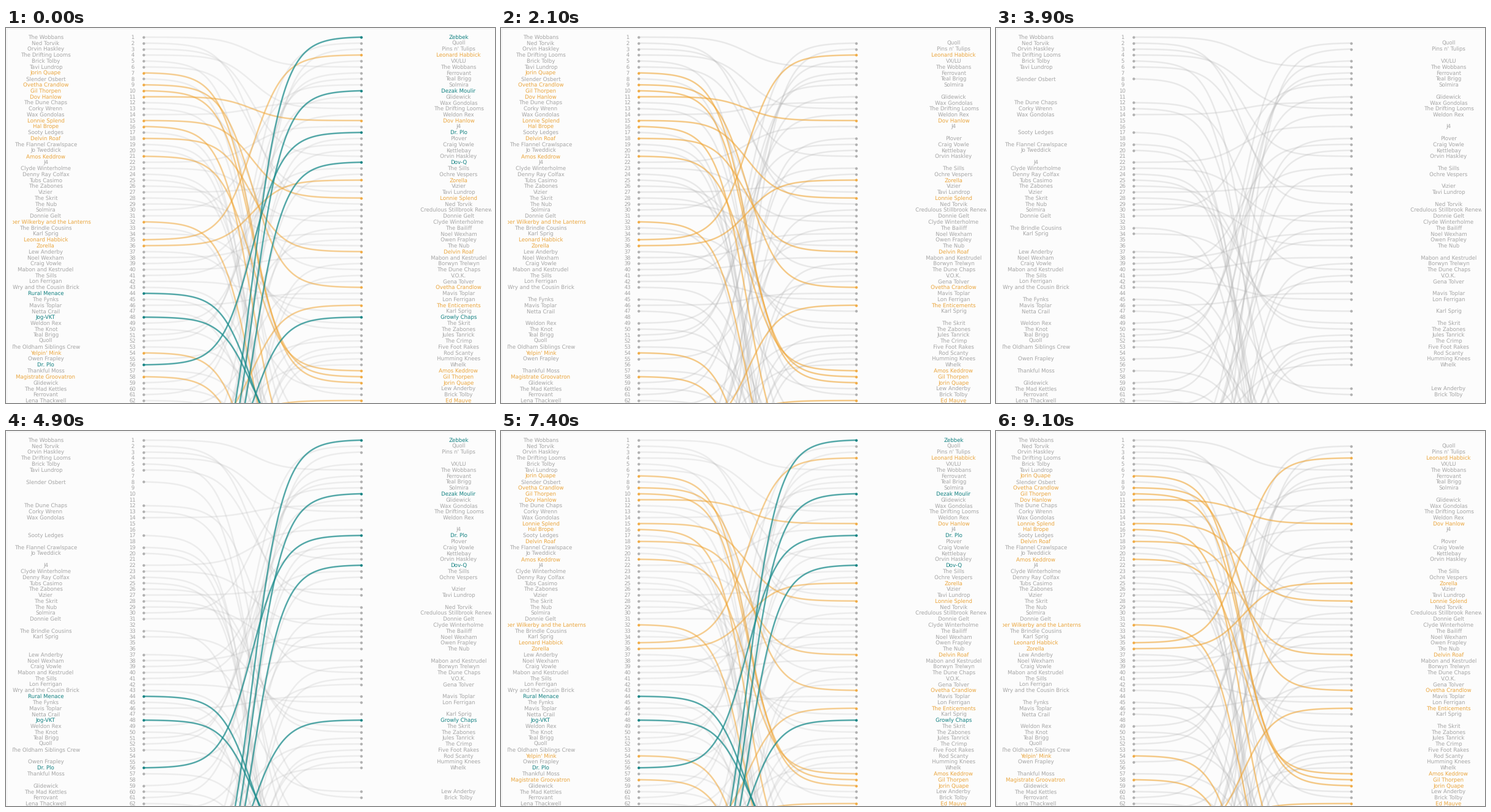
A matplotlib script for the animation above (9200 ms loop, 800x615 px).

```python
import matplotlib.pyplot as plt
import numpy as np
from matplotlib.animation import FuncAnimation
from matplotlib.collections import LineCollection
from matplotlib.patches import Rectangle

W, H, DPI = 800, 615, 100
PX = 72 / DPI
FRAMES, STEP = 92, 100

# "*" marks soul acts, "#" marks rap acts
LEFT = """The Wobbans, Ned Torvik, Orvin Haskley, The Drifting Looms, Brick Tolby,
Tavi Lundrop, *Jorin Quape, Slender Osbert, *Ovetha Crandlow, *Gil Thorpen,
*Dov Hanlow, The Dune Chaps, Corky Wrenn, Wax Gondolas, *Lonnie Splend,
*Hal Brope, Sooty Ledges, *Delvin Roaf, The Flannel Crawlspace, Jo Tweddick,
*Amos Keddrow, J4, Clyde Winterholme, Denny Ray Colfax, Tubs Casimo,
The Zabones, Vizier, The Skrit, The Nub, Solmira, Donnie Gelt,
*Dapper Wilkerby and the Lanterns, The Brindle Cousins, Karl Sprig,
*Leonard Habbick, *Zorella, Lew Anderby, Noel Wexham, Craig Vowle,
Mabon and Kestrudel, The Sills, Lon Ferrigan, Wry and the Cousin Brick,
#Rural Menace, The Fynks, Mavis Toplar, Netta Crail, #Jog-VKT, Weldon Rex,
The Knot, Teal Brigg, Quoll, The Oldham Siblings Crew, *Yelpin' Mink,
Owen Frapley, #Dr. Plo, Thankful Moss, *Magistrate Groovatron, Glidewick,
The Mad Kettles, Ferrovant, Lena Thackwell"""

RIGHT = """#Zebbek, Quoll, Pins n' Tulips, *Leonard Habbick, VX/LU, The Wobbans,
Ferrovant, Teal Brigg, Solmira, #Dezak Moulir, Glidewick, Wax Gondolas,
The Drifting Looms, Weldon Rex, *Dov Hanlow, J4, #Dr. Plo, Plover, Craig Vowle,
Kettlebay, Orvin Haskley, #Dov-Q, The Sills, Ochre Vespers, *Zorella, Vizier,
Tavi Lundrop, *Lonnie Splend, Ned Torvik, Credulous Stillbrook Renewal,
Donnie Gelt, Clyde Winterholme, The Bailiff, Noel Wexham, Owen Frapley, The Nub,
*Delvin Roaf, Mabon and Kestrudel, Borwyn Trelwyn, The Dune Chaps, V.O.K.,
Gena Tolver, *Ovetha Crandlow, Mavis Toplar, Lon Ferrigan, *The Enticements,
Karl Sprig, #Growly Chaps, The Skrit, The Zabones, Jules Tanrick, The Crimp,
Five Foot Rakes, Rod Scanty, Humming Knees, Whelk, *Amos Keddrow, *Gil Thorpen,
*Jorin Quape, Lew Anderby, Brick Tolby, *Ed Mauve"""

# Ranks below the visible part, for acts listed on one side only
LOW_RIGHT = [72, 67, 75, 92, 86, 95, 79, 82, 84, 87, 70,
             74, 81, 88, 71, 76, 68, 93, 73, 96, 78, 80]
LOW_LEFT = [83, 92, 72, 86, 75, 73, 88, 85, 82, 70, 95,
            97, 63, 68, 77, 84, 65, 94, 91, 100, 67, 66]

# text, dot, line colour, line alpha
STYLE = {
    "rock": ("#a4a4a4", "#b0b0b0", "#b0b0b0", 0.20),
    "soul": ("#eaa53c", "#f0ab45", "#efa433", 0.53),
    "rap": ("#0f8080", "#158383", "#1c8c8c", 0.75),
}
X0, X1 = 225, 580.5
STEEP = 7


def parse(block):
    kinds = {"*": "soul", "#": "rap"}
    acts = [a.strip() for a in block.replace("\n", " ").split(",")]
    return {a.lstrip("*#"): (i, kinds.get(a[0], "rock"))
            for i, a in enumerate(acts, 1)}


def row_y(rank):
    return 15 + (rank - 1) * 9.77


def curve(a, b):
    t = np.linspace(-STEEP, STEEP, 140)
    s = 1 / (1 + np.exp(-t))
    s = (s - s[0]) / (s[-1] - s[0])
    return np.column_stack([np.linspace(X0, X1, t.size),
                            row_y(a) + (row_y(b) - row_y(a)) * s])


plt.rcParams["font.family"] = "DejaVu Sans"
plt.rcParams["text.hinting"] = "none"
fig = plt.figure(figsize=(W / DPI, H / DPI), dpi=DPI, facecolor="#fcfcfc")
ax = fig.add_axes([0, 0, 1, 1])
ax.set_xlim(0, W)
ax.set_ylim(H, 0)
ax.axis("off")
ax.add_patch(Rectangle((0.5, 0.5), W - 1, H + 2, fill=False,
                       ec="#eeeeee", lw=PX))
panel = Rectangle((11, 0), 783, H, transform=ax.transData)


def label(x, rank, text, color):
    t = ax.text(x, row_y(rank) + 3, text, color=color, size=8.65 * PX,
                ha="center", va="baseline", clip_on=True)
    t.set_clip_path(panel)
    return t


left, right = parse(LEFT), parse(RIGHT)
low_left, low_right = iter(LOW_LEFT), iter(LOW_RIGHT)
links = {k: [] for k in STYLE}
for name, (rank, kind) in left.items():
    end = right[name][0] if name in right else next(low_right)
    links[kind].append((rank, end))
for name, (rank, kind) in right.items():
    if name not in left:
        links[kind].append((next(low_left), rank))

for n in range(1, len(left) + 1):
    label(207, n, str(n), "#a4a4a4")

groups, lines = {}, {}
for z, (kind, (ink, dot, stroke, alpha)) in enumerate(STYLE.items(), 1):
    lines[kind] = LineCollection([curve(a, b) for a, b in links[kind]],
                                 colors=stroke, alpha=alpha,
                                 linewidths=2.5 * PX, zorder=z)
    ax.add_collection(lines[kind], autolim=False)
    ends = [(x, row_y(r)) for pair in links[kind]
            for x, r in zip((X0, X1), pair)]
    dots, = ax.plot(*zip(*ends), "o", ms=4.3 * PX, color=dot, mew=0,
                    zorder=z + 4)
    groups[kind] = [lines[kind], dots]
    for x, side in ((65, left), (740.5, right)):
        groups[kind] += [label(x, r, name, ink)
                         for name, (r, k) in side.items() if k == kind]


def update(i):
    show = {
        "soul": i < 31 or i >= 56,
        "rap": i < 15 or 45 <= i < 88,
    }
    for kind, on in show.items():
        for artist in groups[kind]:
            artist.set_visible(on)
    # the remaining lines read slightly stronger without the rap group
    for kind in ("rock", "soul"):
        lines[kind].set_alpha(STYLE[kind][3] + (0 if show["rap"] else 0.05))
    return []


anim = FuncAnimation(fig, update, frames=FRAMES, interval=STEP,
                     init_func=lambda: update(0), repeat=True, repeat_delay=0)
plt.show()
```
